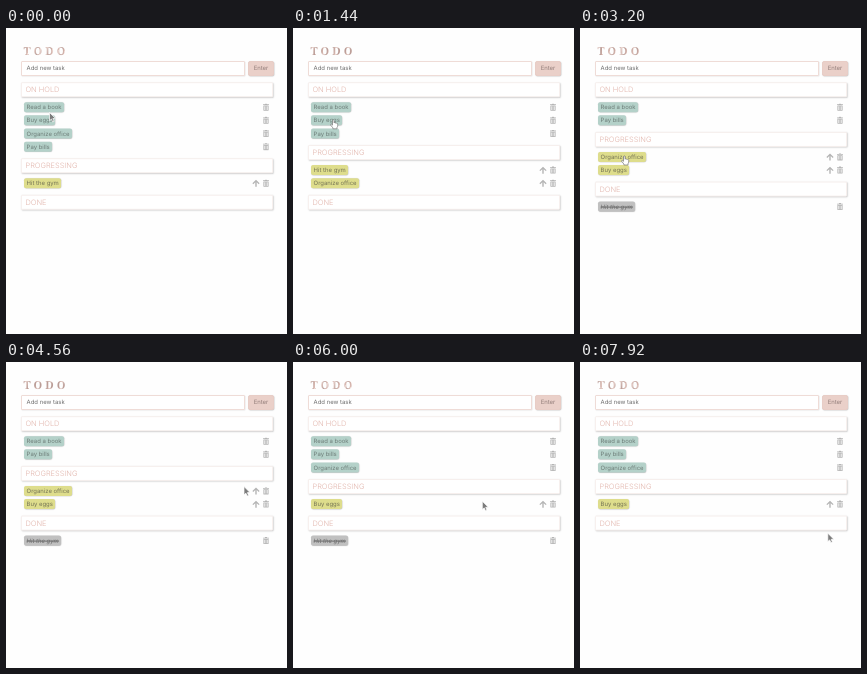
These frames come from a looping animation (281x306 px, 8000 ms). An HTML page:

```html
<!DOCTYPE html>
<html lang="en">
<head>
<meta charset="utf-8">
<title>Todo</title>
<style>
html, body { margin: 0; width: 100%; height: 100%; overflow: hidden; background: #fefefe; }
body { position: relative; font: 5.95px/11px Inter, "Open Sans", sans-serif; text-rendering: geometricPrecision; }
body > * { position: absolute; box-sizing: border-box; white-space: nowrap; }
h1 {
  left: 17px; top: 16px; margin: 0; padding: 0 4px 0 .5px;
  font: bold 11px/16px "Noto Serif", "Liberation Serif", serif; letter-spacing: 3.1px;
  color: transparent;
  background: repeating-linear-gradient(100deg, #ecd6d0 0, #b3958f 3px, #dcbbb3 6px) 0 0 / 48px 100%;
  -webkit-background-clip: text; background-clip: text;
  animation: sheen 8s steps(100) infinite;
}
@keyframes sheen { to { background-position: 48px 0; } }
.field, .enter { top: 33px; height: 15px; line-height: 14px; border: 1px solid #efdcd7; border-radius: 1px; }
.field { left: 15px; width: 224px; padding-left: 4.6px; color: #6c6c6c; background: #fff; box-shadow: .5px .5px 1px #e6e6e6; }
.enter { left: 242px; width: 26px; text-align: center; color: #937e7a; background: #ead0c9; border-color: #e8cdc6; border-radius: 2px; box-shadow: .5px .6px 1px #ccc; }
.head {
  left: 15px; top: -7.5px; width: 252px; height: 15px; padding-left: 3.5px;
  font-size: 7.4px; font-weight: 300; line-height: 14px; color: #e2b6ad;
  border: 1px solid #f7f0ee; border-radius: 1px; background: #fff; box-shadow: .7px .7px 1.5px #ccc;
}
.row { left: 0; top: -5.2px; width: 281px; height: 11px; }
.pill { position: absolute; left: 18px; top: 0; height: 10.5px; padding: 0 2.6px; border-radius: 2px; box-shadow: .4px .4px 1px #c4c4c4; }
.l0 .pill { background: #b4d1c9; color: #6d7d78; }
.l1 .pill { background: #dedd8c; color: #757455; }
.l2 .pill { background: #c0c0c0; color: #6c6c6c; font-style: italic; text-decoration: line-through .5px; }
.row svg { position: absolute; top: 1.5px; width: 8px; height: 8px; fill: #b5b5b5; }
.bin { left: 256px; }
.up { left: 246px; }
.l0 .up, .l2 .up { display: none; }
#cursor { left: 0; top: 0; width: 12px; height: 13px; overflow: visible; }
#cursor path { stroke: #fff; stroke-width: .7; stroke-linejoin: round; }
</style>
</head>
<body>
<h1>TODO</h1>
<div class="field">Add new task</div>
<div class="enter">Enter</div>
<svg id="cursor">
  <path id="arrow" fill="#7c7c7c" d="M0 0V8.3L1.9 6.7L3.2 9.5L4.6 8.9L3.4 6.1L6 6Z"/>
  <path id="hand" fill="#fff" style="stroke:#777" d="M-.8 .6Q0-.6.8.6V3.2L1.1 2.8Q1.8 2.5 2.2 3.2Q3 2.8 3.4 3.6Q4.3 3.4 4.4 4.3V6Q4.3 7 3.7 7.8V9H-.4V8.1L-2.6 5.3Q-2.9 4.4-2 4.3L-.8 5.3Z"/>
</svg>
<script>
const LOOP = 8000, STEP = 80;
const TOP = 61.2, FIRST = 18, PITCH = 13.15, GAP = 23.4;
const titles = ['ON HOLD', 'PROGRESSING', 'DONE'];
const start = [['Read a book', 'Buy eggs', 'Organize office', 'Pay bills'], ['Hit the gym'], []];

// time, task, list it moves to (-1 deletes it)
const moves = [
  [720, 'Organize office', 1],
  [1920, 'Buy eggs', 1],
  [2800, 'Hit the gym', 2],
  [5520, 'Organize office', 0],
  [7200, 'Hit the gym', -1]
];
// time, x, y of the pointer tip
const path = [
  [0, 43.5, 84.4], [480, 41, 104], [960, 41, 104], [1360, 40.3, 91.8], [2000, 40.3, 91.8],
  [2400, 40.3, 119.4], [2640, 42, 127], [2880, 43, 128], [3200, 44.3, 128], [3600, 45, 128.3],
  [4320, 236, 124.5], [4560, 238, 124.5], [4960, 249.5, 128], [5600, 249.5, 128],
  [5920, 189.3, 139.2], [6160, 189.3, 139.2], [6880, 260, 177.5], [7280, 260, 177.5],
  [7680, 247.8, 171.2], [8000, 247.8, 171.2]
];

const cursor = document.getElementById('cursor');
const arrow = document.getElementById('arrow');
const hand = document.getElementById('hand');

function add(cls, html) {
  const el = document.createElement('div');
  el.className = cls;
  el.innerHTML = html;
  document.body.insertBefore(el, cursor);
  return el;
}

const bin = '<svg class="bin" viewBox="0 0 8 8"><path fill-rule="evenodd" d="M1 1.1H2.7L3.1.5H4.9L5.3 1.1H7V1.9H1ZM1.4 2.4H6.6V7Q6.5 7.5 6 7.5H2Q1.5 7.5 1.4 7ZM2.3 3.1V6.7H2.9V3.1ZM3.7 3.1V6.7H4.3V3.1ZM5.1 3.1V6.7H5.7V3.1Z"/></svg>';
const up = '<svg class="up" viewBox="0 0 8 8"><path d="M4 .6L7.6 4.1L6.7 5L4.7 3.1V7.6H3.3V3.1L1.3 5L.4 4.1Z"/></svg>';
const heads = titles.map(text => add('head', text));
const rows = {};
for (const name of start.flat()) rows[name] = add('row', `<span class="pill">${name}</span>${up}${bin}`);

function listsAt(t) {
  let lists = start.map(list => [...list]);
  for (const [when, name, to] of moves) {
    if (t < when) break;
    lists = lists.map(list => list.filter(n => n !== name));
    if (to >= 0) lists[to].push(name);
  }
  return lists;
}

function pointerAt(t) {
  const i = path.findIndex(p => p[0] > t);
  const [t0, x0, y0] = path[i - 1], [t1, x1, y1] = path[i];
  const k = (t - t0) / (t1 - t0), e = k * k * (3 - 2 * k);
  return [x0 + (x1 - x0) * e, y0 + (y1 - y0) * e];
}

function draw(t) {
  const [px, py] = pointerAt(t);
  let y = TOP, over = false;
  for (const name in rows) rows[name].style.display = 'none';
  listsAt(t).forEach((list, n) => {
    heads[n].style.transform = `translateY(${y}px)`;
    list.forEach((name, i) => {
      const row = rows[name], ry = y + FIRST + i * PITCH;
      row.className = 'row l' + n;
      row.style.display = '';
      row.style.transform = `translateY(${ry}px)`;
      const right = 18 + row.firstChild.offsetWidth;
      const onPill = n < 2 && px > 18 && px < right;
      const onIcon = px > (n === 1 ? 246 : 256) && px < 264;
      if (Math.abs(py - ry) < 5.1 && (onPill || onIcon)) over = true;
    });
    y += GAP + PITCH * list.length;
  });
  cursor.style.transform = `translate(${px}px, ${py}px)`;
  arrow.style.display = over ? 'none' : '';
  hand.style.display = over ? '' : 'none';
}

let origin;
function tick(now) {
  origin ??= now;
  draw(Math.floor((now - origin) % LOOP / STEP) * STEP);
  requestAnimationFrame(tick);
}
draw(0);
requestAnimationFrame(tick);
</script>
</body>
</html>
```
